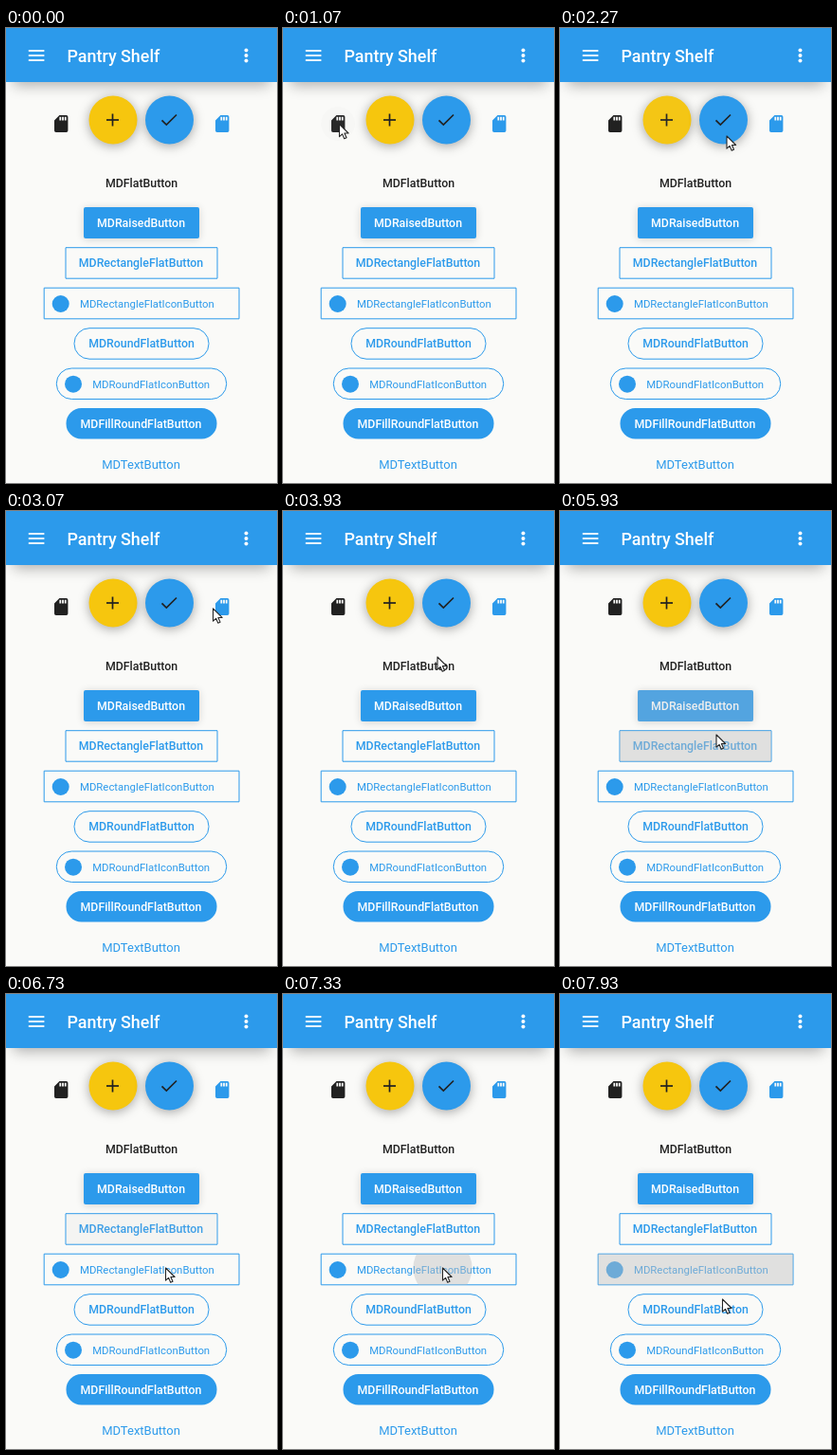
An HTML page with a canvas for the animation above (8 s loop, 286 by 480 pixels).

```html
<!DOCTYPE html>
<html lang="en">
<head>
<meta charset="utf-8">
<title>Button showcase</title>
<style>
  html, body { margin: 0; width: 100%; height: 100%; overflow: hidden; background: #fafaf8; }
  canvas { display: block; width: 286px; height: 480px; }
</style>
</head>
<body>
<canvas id="stage"></canvas>
<script>
const W = 286, H = 480, LOOP = 8000;
const BLUE = '#2c9aeb', YELLOW = '#f6c60e', DARK = '#212121', PAPER = '#fafaf8';
const canvas = document.getElementById('stage');
const ctx = canvas.getContext('2d');
const dpr = window.devicePixelRatio || 1;
canvas.width = W * dpr;
canvas.height = H * dpr;

const CARD = new Path2D('M18,8H16V4H18M15,8H13V4H15M12,8H10V4H12M18,2H10L4,8V20A2,2 0 0,0 6,22H18A2,2 0 0,0 20,20V4A2,2 0 0,0 18,2Z');
const ARROW = new Path2D('M0,0V13.2L3.1,10.4L5.2,15.2L7.5,14.2L5.4,9.5H9.6Z');

// Pointer moves: start, end, target x, target y
const START = [185, 500];
const MOVES = [
  [630, 1010, 59.5, 101.5],
  [1230, 1560, 113, 108],
  [1900, 2240, 176, 114],
  [2760, 3170, 226, 101],
  [3560, 3910, 163, 154],
  [4500, 4920, 165, 196],
  [5240, 5600, 165, 236],
  [6180, 6620, 168.5, 289],
  [7500, 7920, 171.5, 322]
];

const rect = (x, y, w, h, r = 0) => ({ x, y, w, h, r });
const disc = (x, y, r) => rect(x - r, y - r, 2 * r, 2 * r, r);

const AREA = {
  cardLeft: disc(58, 101, 18),
  add: disc(113, 97, 25.5),
  check: disc(172.5, 97, 25.5),
  cardRight: disc(228, 101, 18),
  flat: rect(90, 147, 105, 32, 1),
  raised: rect(82, 189, 122, 33, 2),
  outlined: rect(63, 231.7, 160, 32.5),
  outlinedIcon: rect(40.2, 274.2, 205.8, 32.6),
  round: rect(72, 316.7, 142, 32.5, 16),
  roundIcon: rect(53.3, 359, 179.4, 32.5, 16),
  filled: rect(63.5, 401, 159, 32.5, 16)
};

// Presses: time, button, strongest tint
const PRESSES = [
  [1040, 'cardLeft', 0.34],
  [1720, 'add', 0.34],
  [2400, 'check', 0.34],
  [3330, 'cardRight', 0.34],
  [4080, 'flat', 0.45],
  [5050, 'raised', 0.45],
  [5650, 'outlined', 0.45],
  [7300, 'outlinedIcon', 0.45]
];

const clamp = v => Math.min(1, Math.max(0, v));
const easeOut = v => 1 - (1 - v) * (1 - v);
const easeInOut = v => v * v * (3 - 2 * v);

function trace(a) {
  ctx.beginPath();
  ctx.roundRect(a.x, a.y, a.w, a.h, a.r);
}

function fill(a, color) {
  trace(a);
  ctx.fillStyle = color;
  ctx.fill();
}

function outline(a) {
  trace(a);
  ctx.strokeStyle = BLUE;
  ctx.lineWidth = 1;
  ctx.stroke();
}

function shaded(a, color, alpha, blur, dy) {
  ctx.save();
  ctx.shadowColor = `rgba(0,0,0,${alpha})`;
  ctx.shadowBlur = blur * dpr;
  ctx.shadowOffsetY = dy * dpr;
  fill(a, color);
  ctx.restore();
}

function label(text, x, y, color, size = 12.35, weight = 500, align = 'center') {
  ctx.font = `${weight} ${size}px Roboto, sans-serif`;
  ctx.textAlign = align;
  ctx.fillStyle = color;
  ctx.fillText(text, x, y + size * 0.355);
}

function stroke(points, color, width) {
  ctx.beginPath();
  points.forEach(([x, y]) => ctx.lineTo(x, y));
  ctx.strokeStyle = color;
  ctx.lineWidth = width;
  ctx.stroke();
}

function card(cx, cy, color) {
  ctx.save();
  ctx.translate(cx, cy);
  ctx.scale(0.9, 0.9);
  ctx.translate(-12, -12);
  ctx.fillStyle = color;
  ctx.fill(CARD, 'evenodd');
  ctx.restore();
}

function toolbar() {
  shaded(rect(8, 0, W - 16, 57), BLUE, 0.32, 14, 3);
  fill(rect(0, 0, W, 57), BLUE);
  for (const y of [24, 29, 34]) {
    fill(rect(23.8, y - 0.9, 16.6, 1.8), '#fff');
    fill(disc(253.5, 29 + (y - 29) * 1.12, 2), '#fff');
  }
  label('Pantry Shelf', 64.5, 30, '#fff', 17.9, 500, 'left');
}

function buttons() {
  const a = AREA;
  card(58.2, 101, DARK);
  card(228.2, 101, BLUE);
  shaded(a.add, YELLOW, 0.34, 12, 2);
  shaded(a.check, BLUE, 0.34, 12, 2);
  stroke([[106, 97], [119, 97]], DARK, 1.7);
  stroke([[112.5, 90.5], [112.5, 103.5]], DARK, 1.7);
  stroke([[164.5, 97.3], [169.3, 102], [180, 91.5]], DARK, 1.7);

  label('MDFlatButton', 143, 163.4, DARK);
  shaded(a.raised, BLUE, 0.16, 8, 1);
  label('MDRaisedButton', 142.5, 205.5, '#fff');
  outline(a.outlined);
  label('MDRectangleFlatButton', 142.5, 247.7, BLUE);
  outline(a.outlinedIcon);
  fill(disc(57.7, 291, 9), BLUE);
  label('MDRectangleFlatIconButton', 78, 291, BLUE, 11.37, 400, 'left');
  outline(a.round);
  label('MDRoundFlatButton', 143, 333, BLUE);
  outline(a.roundIcon);
  fill(disc(71, 375.7, 9), BLUE);
  label('MDRoundFlatIconButton', 91.2, 375.7, BLUE, 11.37, 400, 'left');
  fill(a.filled, BLUE);
  label('MDFillRoundFlatButton', 142.5, 417.5, '#fff');
  label('MDTextButton', 142.5, 460, BLUE, 13, 400);
}

function pointerAt(t) {
  let [x, y] = START;
  for (const [from, to, tx, ty] of MOVES) {
    const p = easeInOut(clamp((t - from) / (to - from)));
    x += (tx - x) * p;
    y += (ty - y) * p;
  }
  return [x, y];
}

function ripple(t, [start, name, tint]) {
  const age = t - start;
  const a = AREA[name];
  const isCard = name.startsWith('card');
  const isDisc = a.w === a.h;
  const [hold, end] = isDisc ? [250, 590] : [630, 1240];
  if (age <= 0 || age >= end) return;

  const alpha = tint * (isCard ? clamp(age / 200) : 1) * (1 - clamp((age - hold) / (end - hold)));
  const [px, py] = isCard ? [a.x + a.r, a.y + a.r] : pointerAt(start);
  const reach = isCard ? a.r : Math.hypot(
    Math.max(px - a.x, a.x + a.w - px),
    Math.max(py - a.y, a.y + a.h - py));
  const radius = isCard ? reach : 8 + (reach - 8) * easeOut(clamp(age / 300));
  ctx.save();
  trace(a);
  ctx.clip();
  fill(disc(px, py, radius), `rgba(190,190,190,${alpha})`);
  ctx.restore();
}

function pointer(t) {
  const [x, y] = pointerAt(t);
  ctx.save();
  ctx.translate(x, y);
  ctx.lineJoin = 'round';
  ctx.lineWidth = 1.1;
  ctx.fillStyle = '#fff';
  ctx.strokeStyle = '#262626';
  ctx.fill(ARROW);
  ctx.stroke(ARROW);
  ctx.restore();
}

function draw(now) {
  const t = now % LOOP;
  ctx.setTransform(dpr, 0, 0, dpr, 0, 0);
  ctx.fillStyle = PAPER;
  ctx.fillRect(0, 0, W, H);
  toolbar();
  buttons();
  PRESSES.forEach(press => ripple(t, press));
  pointer(t);
}

let origin;
function tick(now) {
  origin ??= now;
  draw(now - origin);
  requestAnimationFrame(tick);
}
draw(0);
requestAnimationFrame(tick);
</script>
</body>
</html>
```
